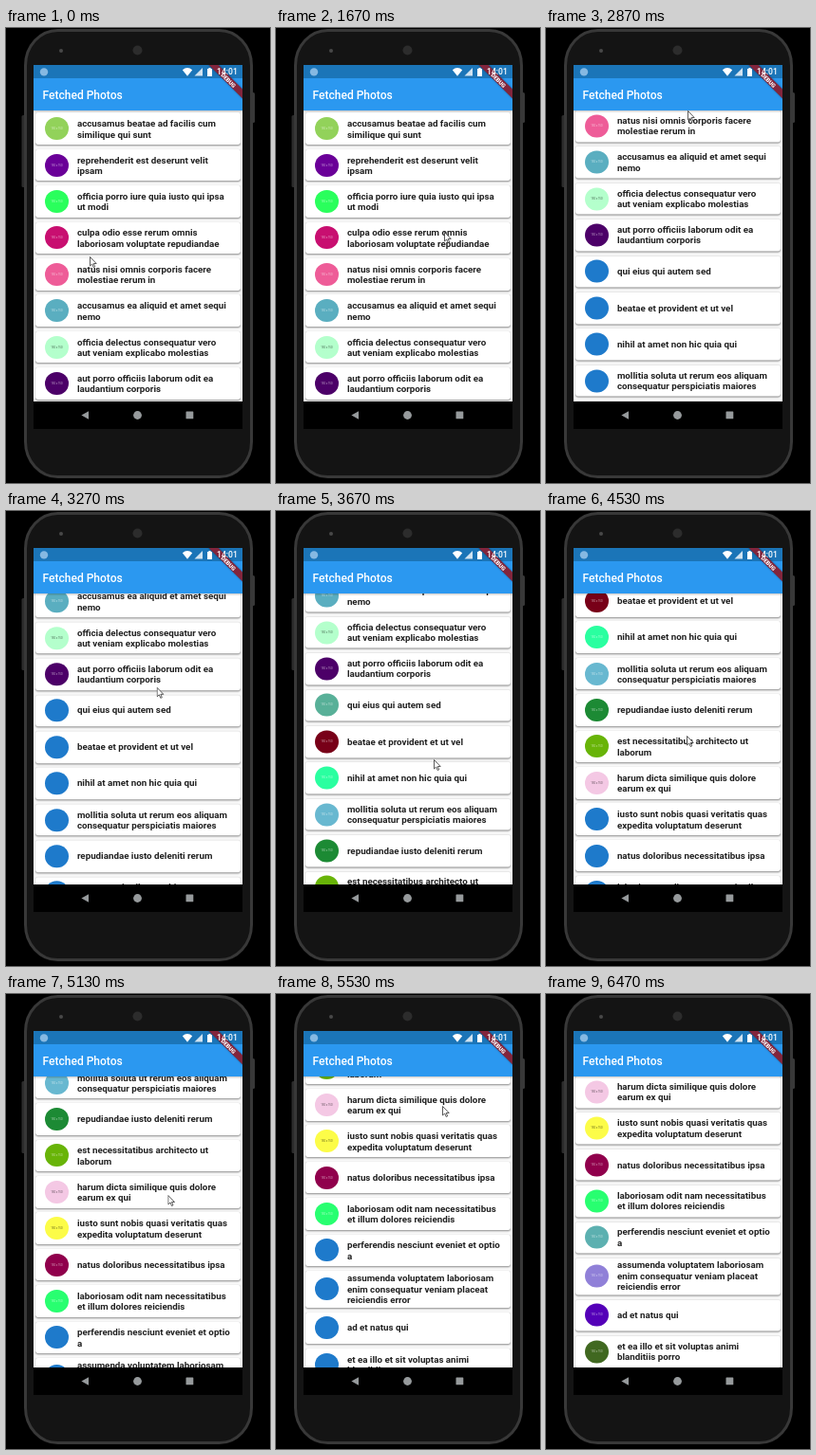
An HTML page that plays this animation: 278x480 px, repeating every 6.99 s.

```html
<!DOCTYPE html>
<html lang="en">
<head>
<meta charset="utf-8">
<title>Fetched Photos</title>
<style>
html, body { margin: 0; width: 100%; height: 100%; overflow: hidden; background: #000; }
body { position: relative; font-family: Roboto, sans-serif; }
div, svg { position: absolute; box-sizing: border-box; }
#screen { left: 29px; top: 39px; width: 220px; height: 384px; overflow: hidden; background: #fafafa; }
#status { width: 220px; height: 14.4px; background: #1b75b8; }
#clock { left: 193px; top: 0; font: 500 8.6px/14.4px Roboto, sans-serif; color: #fff; }
#bar { top: 14.4px; width: 220px; height: 33.6px; padding-left: 9.6px; background: #2b98f0; color: #fff;
  font: 500 12px/36px Roboto, sans-serif; box-shadow: 0 1px 2px rgba(0,0,0,.25); }
#banner { left: 220px; top: 0; width: 0; height: 0; transform: rotate(45deg); }
#banner div { left: -26px; top: 18px; width: 54px; height: 7.3px; background: #82253c; color: #fff;
  font: 900 6px/7.3px Roboto, sans-serif; text-align: center; box-shadow: 0 0 2px rgba(0,0,0,.45); }
#nav { top: 355.2px; width: 220px; height: 28.8px; background: #000; }
#list { top: 48px; left: 0; width: 220px; }
.card { left: 2.4px; width: 215.2px; background: #fff; border-radius: 2.4px;
  box-shadow: 0 1.3px 1.8px rgba(0,0,0,.38), 0 0 1px rgba(0,0,0,.25); }
.dot { left: 9.8px; top: calc(50% - 12px); width: 24.4px; height: 24px; border-radius: 50%;
  font: 2.8px/24px Roboto, sans-serif; text-align: center; }
.label { left: 43.5px; top: 50%; transform: translateY(-50%); white-space: pre; color: #202020;
  font: 700 9.78px/11.4px Roboto, sans-serif; }
</style>
</head>
<body>
<svg width="278" height="480" style="left:0;top:0">
  <rect x="16.5" y="92" width="4" height="76" rx="1.5" fill="#2c2c2c"/>
  <rect x="258" y="68" width="4" height="32" rx="1.5" fill="#383838"/>
  <rect x="20.5" y="2.5" width="238" height="471" rx="34" ry="37" fill="#141414" stroke="#383838" stroke-width="3"/>
  <circle cx="138.5" cy="23.5" r="5" fill="#2c2c2c"/>
  <circle cx="58" cy="24" r="2" fill="#484848"/>
</svg>
<div id="screen">
  <div id="list"></div>
  <div id="bar">Fetched Photos</div>
  <div id="status">
    <svg width="220" height="15" fill="#fff">
      <circle cx="11" cy="7.4" r="4.2" fill="#86b9e2"/>
      <path d="M156.8 5.2Q162 1 167.2 5.2L162 11.8Z"/>
      <path d="M178 3V11.5H169.5Z" opacity=".8"/>
      <path d="M183 4h1.4V3h2.2v1H188v8h-5z"/>
    </svg>
  </div>
  <div id="banner"><div>DEBUG</div></div>
  <div id="clock">14:01</div>
  <div id="nav">
    <svg width="220" height="29" fill="#969a9c">
      <path d="M58 10.2V18.8L50.4 14.5Z"/>
      <circle cx="109.5" cy="14.5" r="4.4"/>
      <rect x="160.5" y="10.5" width="7.8" height="7.8" rx=".6"/>
    </svg>
  </div>
</div>
<svg id="cursor" width="9" height="13" style="left:0;top:0">
  <path d="M.5 .5V10L2.7 8L4.2 11.5L5.7 10.8L4.2 7.5H7.2Z" fill="#fff" stroke="#333" stroke-width=".8"/>
</svg>
<script>
const LOOP = 6990, TICK = 1000 / 15, PLACEHOLDER = '#1e7acb';

const photos = [
  ['#92d25a', 'accusamus beatae ad facilis cum\nsimilique qui sunt'],
  ['#6a0098', 'reprehenderit est deserunt velit\nipsam'],
  ['#2aff5c', 'officia porro iure quia iusto qui ipsa\nut modi'],
  ['#c80f70', 'culpa odio esse rerum omnis\nlaboriosam voluptate repudiandae'],
  ['#ee5c98', 'natus nisi omnis corporis facere\nmolestiae rerum in'],
  ['#5aaec0', 'accusamus ea aliquid et amet sequi\nnemo'],
  ['#b4ffcc', 'officia delectus consequatur vero\naut veniam explicabo molestias'],
  ['#4c0068', 'aut porro officiis laborum odit ea\nlaudantium corporis'],
  ['#58b098', 'qui eius qui autem sed'],
  ['#780018', 'beatae et provident et ut vel'],
  ['#2affa0', 'nihil at amet non hic quia qui'],
  ['#68b8d0', 'mollitia soluta ut rerum eos aliquam\nconsequatur perspiciatis maiores'],
  ['#1c8a34', 'repudiandae iusto deleniti rerum'],
  ['#68b408', 'est necessitatibus architecto ut\nlaborum'],
  ['#f4c8e4', 'harum dicta similique quis dolore\nearum ex qui'],
  ['#fcfc48', 'iusto sunt nobis quasi veritatis quas\nexpedita voluptatum deserunt'],
  ['#90004c', 'natus doloribus necessitatibus ipsa'],
  ['#28ff70', 'laboriosam odit nam necessitatibus\net illum dolores reiciendis'],
  ['#5cb0b0', 'perferendis nesciunt eveniet et optio\na'],
  ['#9080d8', 'assumenda voluptatem laboriosam\nenim consequatur veniam placeat\nreiciendis error'],
  ['#5400b8', 'ad et natus qui'],
  ['#406820', 'et ea illo et sit voluptas animi\nblanditiis porro']
];

// each fling slows to rest; the photos up to `last` then load
const flings = [
  { at: 2860, time: 1, by: 156.6, last: 7 },
  { at: 2867, time: 600, by: 52, last: 14 },
  { at: 3730, time: 1020, by: 155.4, last: 17 },
  { at: 4950, time: 808, by: 176.6, last: 21 }
];

// pointer stops: time, x, y
const stops = [
  [0, 88, 241], [1600, 177, 215], [2270, 177, 215], [2660, 149, 87], [2870, 149, 87],
  [3600, 166, 262], [3730, 166, 262], [4130, 149, 130], [4530, 148, 237],
  [4930, 168, 258], [5460, 175, 118], [5800, 175, 118], [6270, 264, 190]
];

const clamp = u => Math.min(1, Math.max(0, u));
const easeOut = u => 1 - (1 - u) ** 2;
const smooth = u => u * u * (3 - 2 * u);

const scrollAt = t =>
  flings.reduce((sum, f) => sum + f.by * easeOut(clamp((t - f.at) / f.time)), 0);

function pointerAt(t) {
  const next = stops.findIndex(s => s[0] > t);
  if (next < 0) return null;
  const [t0, x0, y0] = stops[next - 1], [t1, x1, y1] = stops[next];
  const u = smooth((t - t0) / (t1 - t0));
  return [x0 + (x1 - x0) * u, y0 + (y1 - y0) * u];
}

function loadTime(i) {
  const fling = flings.find(f => i <= f.last);
  return fling === flings[0] ? 0 : fling.at + fling.time + (i % 3) * TICK;
}

function add(parent, cls, text = '') {
  const el = parent.appendChild(document.createElement('div'));
  el.className = cls;
  el.textContent = text;
  return el;
}

function isLight(hex) {
  const part = n => parseInt(hex.substr(n, 2), 16);
  return part(1) + part(3) + part(5) > 570;
}

const list = document.getElementById('list');
const cursor = document.getElementById('cursor');
let cardTop = 2.4;
const dots = photos.map(([color, text], i) => {
  const height = text.split('\n').length > 2 ? 38.8 : 33.6;
  const card = add(list, 'card');
  card.style.top = cardTop + 'px';
  card.style.height = height + 'px';
  cardTop += height + 4.8;
  const el = add(card, 'dot', '150 x 150');
  add(card, 'label', text);
  const ink = isLight(color) ? 'rgba(0,0,0,.6)' : 'rgba(255,255,255,.65)';
  return { el, color, ink, at: loadTime(i) };
});

function draw(now) {
  // the screen refreshes at 15 pictures a second
  const t = Math.floor((now % LOOP + 5) / TICK) * TICK;
  list.style.transform = `translateY(${-scrollAt(t)}px)`;
  const pointer = pointerAt(t);
  cursor.style.visibility = pointer ? 'visible' : 'hidden';
  if (pointer) cursor.style.transform = `translate(${pointer[0]}px, ${pointer[1]}px)`;
  for (const { el, color, ink, at } of dots) {
    const loaded = t >= at;
    el.style.background = loaded ? color : PLACEHOLDER;
    el.style.color = loaded ? ink : 'transparent';
  }
}

const start = performance.now();
(function tick() {
  draw(performance.now() - start);
  requestAnimationFrame(tick);
})();
</script>
</body>
</html>
```
